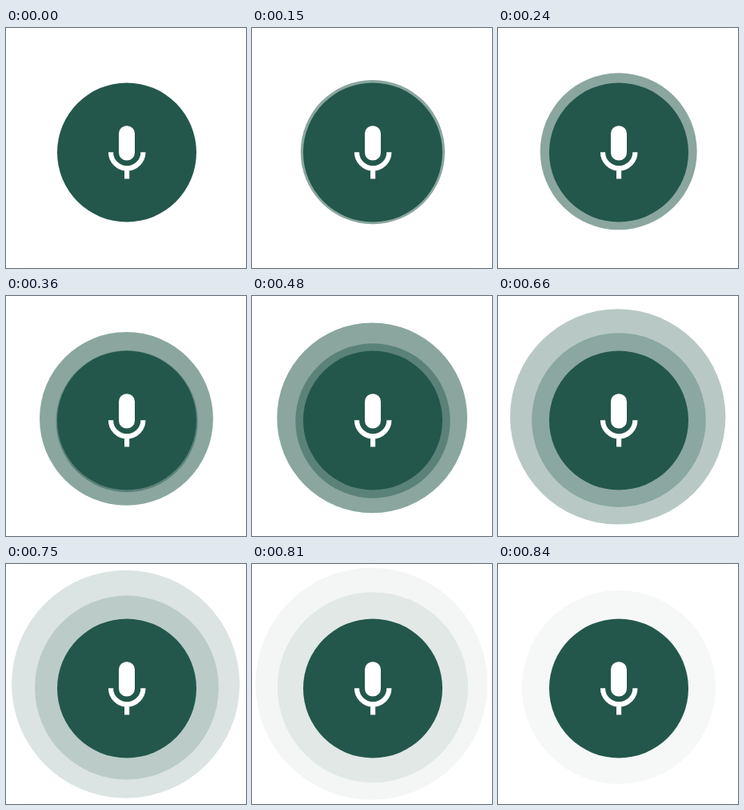
These frames come from a looping animation (300x300 px, 1.2 s). An HTML page:

```html
<!DOCTYPE html>
<html lang="en">
<head>
<meta charset="utf-8">
<title>Voice pulse</title>
<style>
  html, body { margin: 0; width: 100%; height: 100%; overflow: hidden; background: #fff; }
  svg { display: block; width: 100vw; height: 100vh; }
</style>
</head>
<body>
<svg viewBox="0 0 300 300">
  <g fill="#23574b">
    <circle id="outer"/>
    <circle id="inner"/>
    <circle cx="151" cy="155.5" r="87"/>
  </g>
  <rect x="141" y="122.2" width="20" height="43.4" rx="9.8" fill="#fff"/>
  <path d="M131 155.2a20.2 20.2 0 0 0 40.4 0M151.1 175v13.6" fill="none" stroke="#fff" stroke-width="6.2"/>
</svg>
<script>
const LOOP = 1200, STEP = 30, START = 120, END = 840, FADE = 545;

// Position, radius and opacity at START, with their change per millisecond
const rings = [
  { id: "outer", x: 151, dx: -0.0023, y: 155.3, dy: -0.0081,
    r: 87.5, dr: 0.0873, maxR: 145, a: 0.53, da: -0.0018 },
  { id: "inner", x: 151.2, dx: -0.0004, y: 158, dy: -0.0055,
    r: 72.4, dr: 0.0675, maxR: 121, a: 0.46, da: -0.00141 }
];

function drawRing(ring, t) {
  const el = document.getElementById(ring.id);
  const age = Math.max(0, t - START);
  const alpha = t < START ? 0 : ring.a + ring.da * Math.max(0, t - FADE);
  el.setAttribute("cx", ring.x + ring.dx * age);
  el.setAttribute("cy", ring.y + ring.dy * age);
  el.setAttribute("r", Math.min(ring.maxR, ring.r + ring.dr * age));
  el.setAttribute("opacity", Math.max(0, alpha));
}

const origin = performance.now();

function draw(now) {
  const time = Math.max(0, now - origin) % LOOP;
  const t = Math.min(END, Math.floor(time / STEP) * STEP);
  rings.forEach(ring => drawRing(ring, t));
  requestAnimationFrame(draw);
}

draw(origin);
</script>
</body>
</html>
```
